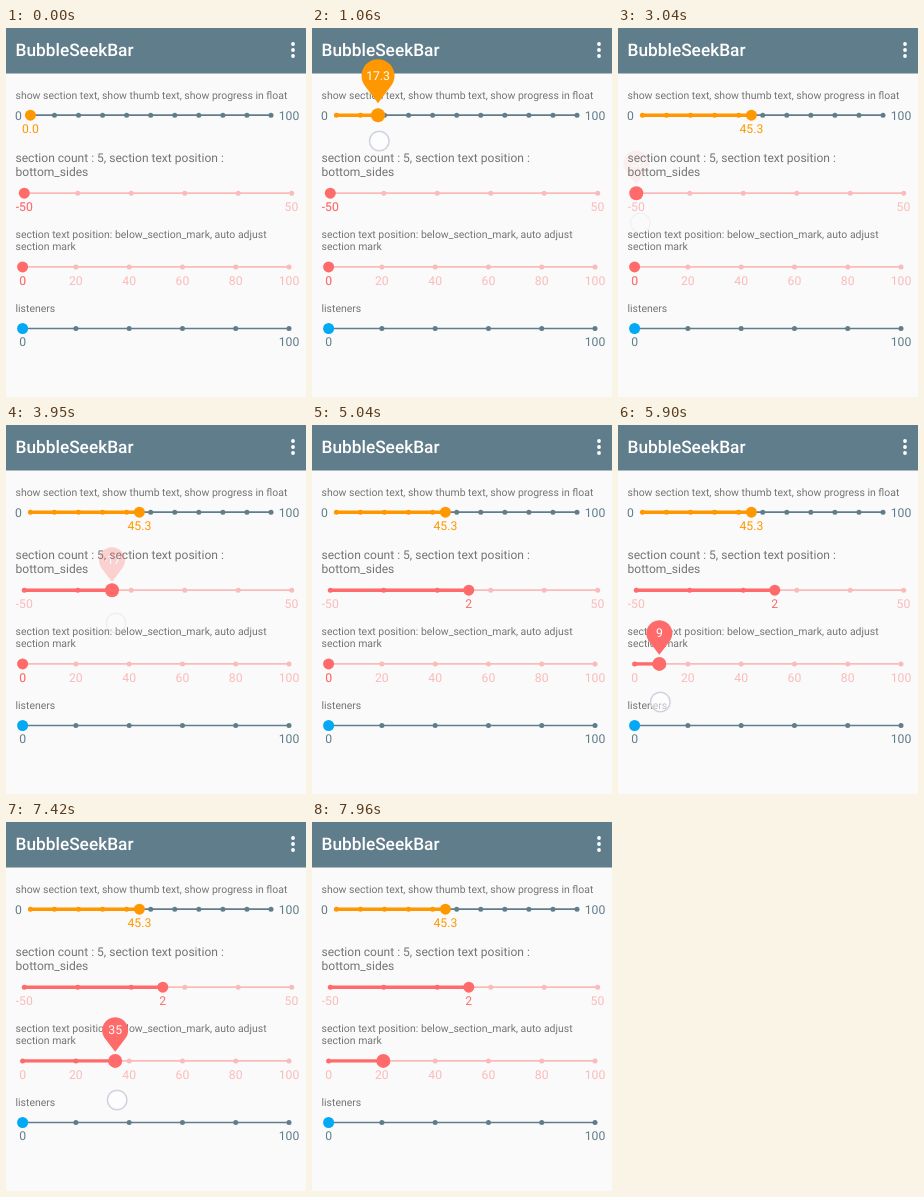
An HTML page for the animation above (8000 ms loop, 300 by 369 pixels).

```html
<!DOCTYPE html>
<html lang="en">
<head>
<meta charset="utf-8">
<title>BubbleSeekBar</title>
<style>
  html, body { margin: 0; width: 100%; height: 100%; overflow: hidden; background: #fafafa; }
  svg {
    display: block; width: 100vw; height: 100vh;
    font-family: Roboto, "Noto Sans", sans-serif; text-rendering: geometricPrecision;
  }
</style>
</head>
<body>
<svg id="stage" viewBox="0 0 300 369"></svg>
<script>
const LOOP = 8000, FADE = 170, REST = 230;
const SLATE = '#607d8b', ORANGE = '#ff9800', RED = '#ff6b6b', PINK = '#fabbbb', BLUE = '#03a9f4';
const stage = document.getElementById('stage');

function add(parent, tag, attrs, text) {
  const el = document.createElementNS('http://www.w3.org/2000/svg', tag);
  set(el, attrs);
  if (text !== undefined) el.textContent = text;
  parent.appendChild(el);
  return el;
}
function set(el, attrs) {
  for (const k in attrs) el.setAttribute(k, attrs[k]);
}
const clamp = v => Math.max(0, Math.min(1, v));

const bars = [
  { x0: 24.4, x1: 265, y: 87.2, parts: 10, lo: 0, hi: 100, digits: 1, track: SLATE, color: ORANGE,
    textY: 105, bubble: 16.5, lift: 56, labels: [[12.5, 91.5, '0'], [283, 91.5, '100']] },
  { x0: 18.3, x1: 285.7, y: 165.2, parts: 5, lo: -50, hi: 50, digits: 0, track: PINK, color: RED,
    textY: 183, bubble: 13, lift: 43, labels: [[18.3, 183, '-50'], [285.4, 183, '50']] },
  { x0: 16.6, x1: 283, y: 238.9, parts: 5, lo: 0, hi: 100, digits: 0, track: PINK, color: RED,
    textY: 257, bubble: 13, lift: 43.7,
    labels: [0, 1, 2, 3, 4, 5].map(i => [16.6 + i * 53.28, 257, i * 20]) },
  { x0: 16.6, x1: 283, y: 300.5, parts: 5, lo: 0, hi: 100, digits: 0, track: SLATE, color: BLUE,
    textColor: SLATE, textY: 318, labels: [[283, 318, '100']] }
];

// path: [time, thumb x]; dx and y place the finger relative to the thumb
const drags = [
  { bar: 0, press: 740, release: 1190, path: [[800, 24.4], [1050, 66]], dx: 1.3, y: [113, 113] },
  { bar: 0, press: 1680, release: 2560, path: [[1740, 66], [2160, 118.2], [2440, 133.4]], dx: 4.8, y: [122, 129] },
  { bar: 1, press: 3030, release: 3830, path: [[3100, 18.3], [3600, 110], [3790, 106]], dx: 4, y: [195, 198] },
  { bar: 1, press: 4290, release: 4800, path: [[4350, 106], [4640, 156.8]], dx: 4, y: [200, 200] },
  { bar: 2, press: 5620, release: 6480, path: [[5700, 16.6], [6370, 99], [6480, 99], [6680, 123.2]], dx: 1, y: [277, 277] },
  { bar: 2, press: 7150, release: 7780, path: [[7230, 123.2], [7750, 85], [7780, 85], [7980, 69.9]], dx: 2, y: [278, 278] }
];

function along(path, t) {
  if (t <= path[0][0]) return path[0][1];
  for (let i = 1; i < path.length; i++) {
    const [ta, a] = path[i - 1], [tb, b] = path[i];
    if (t < tb) return a + (b - a) * (t - ta) / (tb - ta);
  }
  return path[path.length - 1][1];
}

function label(parent, x, y, text, fill) {
  return add(parent, 'text', { x, y, fill, 'font-size': 12.2, 'text-anchor': 'middle' }, text);
}

function bubblePath(r) {
  const x = r * Math.sqrt(3) / 2, y = r * 1.5, tip = r * 8 / 3, c = 1.7;
  return `M0 ${tip}Q${-x - c} ${y - c} ${-x} ${y}A${r} ${r} 0 1 1 ${x} ${y}Q${x + c} ${y - c} 0 ${tip}Z`;
}

function buildPage() {
  add(stage, 'rect', { width: 300, height: 369, fill: '#fafafa' });
  add(stage, 'rect', { width: 300, height: 45.5, fill: SLATE });
  add(stage, 'text', { x: 9.5, y: 28.3, fill: '#fff', 'font-size': 17.3, 'font-weight': 500 }, 'BubbleSeekBar');
  for (const y of [16, 22, 28]) add(stage, 'circle', { cx: 287, cy: y, r: 1.9, fill: '#fff' });
  const captions = [
    [70.5, 10.46, 'show section text, show thumb text, show progress in float'],
    [133.7, 12.05, 'section count : 5, section text position :'],
    [148, 12.05, 'bottom_sides'],
    [210.3, 10.46, 'section text position: below_section_mark, auto adjust'],
    [222.3, 10.46, 'section mark'],
    [284, 10.46, 'listeners']
  ];
  for (const [y, size, text] of captions)
    add(stage, 'text', { x: 9.5, y, fill: '#747474', 'font-size': size }, text);
}

function buildBar(bar) {
  const { x0, x1, y, color } = bar;
  add(stage, 'line', { x1: x0, x2: x1, y1: y, y2: y, stroke: bar.track, 'stroke-width': 1.7 });
  bar.fill = add(stage, 'line', { x1: x0, y1: y, y2: y, stroke: color, 'stroke-width': 3.4 });
  bar.dots = [];
  for (let i = 0; i <= bar.parts; i++) {
    const cx = x0 + (x1 - x0) * i / bar.parts;
    bar.dots.push({ cx, el: add(stage, 'circle', { cx, cy: y, r: 2.5 }) });
  }
  for (const [x, ty, text] of bar.labels) label(stage, x, ty, text, bar.track);
  bar.value = label(stage, x0, bar.textY, '', bar.textColor || color);
  bar.thumb = add(stage, 'circle', { cy: y, fill: color });
}

function buildBubble(bar) {
  if (!bar.bubble) return;
  bar.tag = add(stage, 'g', {});
  add(bar.tag, 'path', { d: bubblePath(bar.bubble), fill: bar.color });
  bar.tagText = label(bar.tag, 0, bar.bubble + 4.3, '', '#fff');
}

buildPage();
bars.forEach(buildBar);
bars.forEach(buildBubble);
const finger = add(stage, 'circle', { r: 9.8, fill: '#fff', 'fill-opacity': .55, stroke: '#cfd3df', 'stroke-width': 1.5 });

function drawBar(bar, index, t) {
  const drag = drags.filter(d => d.bar === index && d.press <= t).pop();
  const x = drag ? along(drag.path, t) : bar.x0;
  const held = drag && t < drag.release + REST;
  const value = bar.lo + (bar.hi - bar.lo) * (x - bar.x0) / (bar.x1 - bar.x0);
  const text = (Math.abs(value) < .05 ? 0 : value).toFixed(bar.digits);

  set(bar.fill, { x2: x });
  for (const dot of bar.dots) set(dot.el, { fill: dot.cx <= x ? bar.color : bar.track });
  set(bar.thumb, { cx: x, r: held ? 7 : 5.5 });
  set(bar.value, { x, opacity: held ? 0 : 1 });
  bar.value.textContent = text;

  if (bar.tag) {
    const alpha = held ? Math.min(clamp((t - drag.press) / FADE), clamp(1 - (t - drag.release) / FADE)) : 0;
    set(bar.tag, { transform: `translate(${x} ${bar.y - bar.lift})`, opacity: alpha });
    bar.tagText.textContent = text;
  }
}

function drawFinger(t) {
  const drag = drags.find(d => t >= d.press && t < d.release + FADE);
  if (!drag) return set(finger, { opacity: 0 });
  const [ya, yb] = drag.y;
  const k = clamp((t - drag.press) / (drag.release - drag.press));
  set(finger, {
    cx: along(drag.path, Math.min(t, drag.release)) + drag.dx,
    cy: ya + (yb - ya) * Math.min(1, k * 1.3),
    opacity: Math.min(clamp((t - drag.press) / 60), clamp(1 - (t - drag.release) / FADE))
  });
}

function draw(t) {
  bars.forEach((bar, i) => drawBar(bar, i, t));
  drawFinger(t);
}

const start = performance.now();
function tick() {
  draw((performance.now() - start) % LOOP);
  requestAnimationFrame(tick);
}
tick();
</script>
</body>
</html>
```
